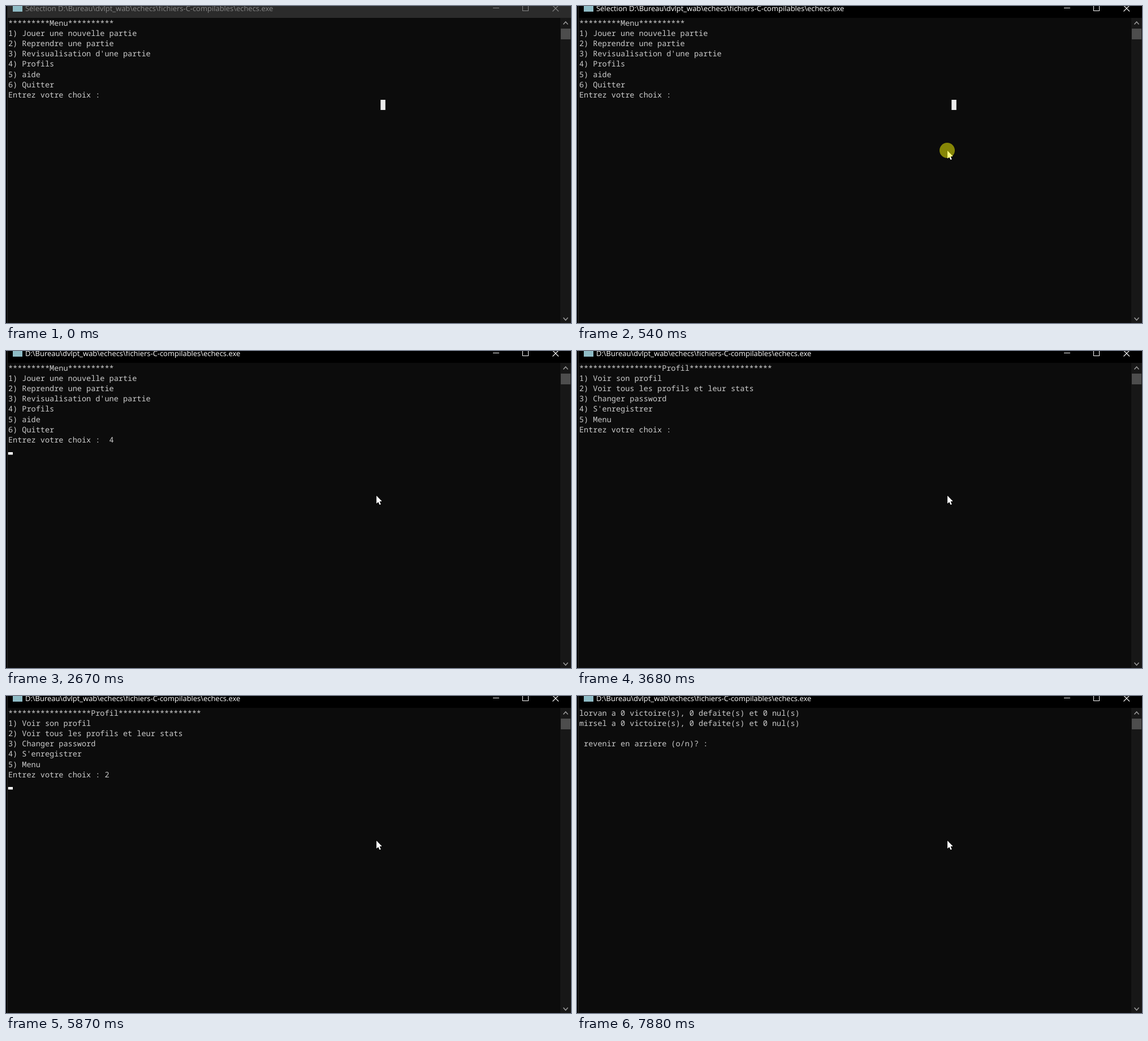
Animation, 999 px wide and 561 px high, one loop 8000 ms. Source, as an HTML page with a canvas:

```html
<!DOCTYPE html>
<html lang="fr">
<head>
<meta charset="utf-8">
<title>Console</title>
<style>
html, body { margin: 0; width: 999px; height: 561px; overflow: hidden; background: #0c0c0c; }
canvas { display: block; }
</style>
</head>
<body>
<canvas id="stage" width="999" height="561"></canvas>
<script>
const ctx = document.getElementById('stage').getContext('2d');
const LOOP = 8000;
const LEFT = 4, TOP = 21, CELL_W = 8.125, CELL_H = 18.1;
const PATH = 'D:\\Bureau\\dvlpt_wab\\echecs\\fichiers-C-compilables\\echecs.exe';
const stars = n => '*'.repeat(n);

const MENU = [
  stars(9) + 'Menu' + stars(10),
  '1) Jouer une nouvelle partie',
  '2) Reprendre une partie',
  "3) Revisualisation d'une partie",
  '4) Profils',
  '5) aide',
  '6) Quitter',
  'Entrez votre choix :  '
];
const PROFILE = [
  stars(18) + 'Profil' + stars(18),
  '1) Voir son profil',
  '2) Voir tous les profils et leur stats',
  '3) Changer password',
  "4) S'enregistrer",
  '5) Menu',
  'Entrez votre choix : '
];
const score = name => name + ' a 0 victoire(s), 0 defaite(s) et 0 nul(s)';
const STATS = [score('lorvan'), score('mirsel'), '', ' revenir en arriere (o/n)? : '];

// Each step: start time, page, typed answer, caret visible
const STEPS = [
  [0, MENU, '', false],
  [1010, MENU, '', true],
  [1540, MENU, '', false],
  [2070, MENU, '', true],
  [2270, MENU, '4', true],
  [2600, MENU, '4', false],
  [2670, MENU, '4\n', true],
  [2740, PROFILE, '', true],
  [3680, PROFILE, '', false],
  [4210, PROFILE, '', true],
  [4740, PROFILE, '', false],
  [4870, PROFILE, '2', true],
  [5270, PROFILE, '2', false],
  [5800, PROFILE, '2', true],
  [5870, PROFILE, '2\n', true],
  [5940, STATS, '', true],
  [6820, STATS, '', false],
  [7350, STATS, '', true],
  [7880, STATS, '', false]
];

function rect(color, x, y, w, h) {
  ctx.fillStyle = color;
  ctx.fillRect(x, y, w, h);
}

function line(color, width, ...pts) {
  ctx.strokeStyle = color;
  ctx.lineWidth = width;
  ctx.beginPath();
  for (let i = 0; i < pts.length; i += 2) ctx.lineTo(pts[i], pts[i + 1]);
  ctx.stroke();
}

function drawTitle(active, selecting) {
  const ink = active ? '#ffffff' : '#868686';
  rect(active ? '#000000' : '#2b2b2b', 3, 0, 996, 21);
  rect('#8fbcc6', 12, 0, 17, 10);
  ctx.font = '12.95px "Open Sans", "Noto Sans", sans-serif';
  ctx.fillStyle = ink;
  ctx.fillText((selecting ? 'Sélection ' : '') + PATH, 34, 9);
  line(ink, 1, 861, 3.5, 872, 3.5);
  ctx.strokeRect(913.5, -1.5, 10, 10);
  line(ink, 1.1, 966.5, -1, 977, 9.5);
  line(ink, 1.1, 977, -1, 966.5, 9.5);
}

function drawFrame() {
  rect('#0c0c0c', 0, 0, 999, 561);
  rect('#171717', 980, 21, 19, 540);
  rect('#4d4d4d', 981, 40, 17, 19);
  line('#9a9a9a', 1.5, 985.5, 32.5, 989.5, 28, 993.5, 32.5);
  line('#9a9a9a', 1.5, 985.5, 551.5, 989.5, 556, 993.5, 551.5);
  rect('#000000', 0, 0, 2, 561);
  rect('#2d2d2d', 2, 0, 1, 561);
}

function drawConsole(page, answer, caret) {
  const rows = (page.join('\n') + answer).split('\n');
  ctx.font = '13.54px "Noto Sans Mono", "DejaVu Sans Mono", monospace';
  ctx.fillStyle = '#cccccc';
  rows.forEach((row, i) => ctx.fillText(row, LEFT, TOP + i * CELL_H + 14));
  if (!caret) return;
  const col = rows[rows.length - 1].length;
  const bottom = Math.round(TOP + rows.length * CELL_H);
  rect('#ffffff', LEFT + col * CELL_W - 0.2, bottom - 5, 8.2, 4.5);
}

function drawPointer(t) {
  if (t < 130) return;
  const p = Math.min(1, Math.floor((t - 130) / 69) / 4);
  const rest = Math.pow(1 - p, 2);
  const x = 655 - 12 * rest, y = 256 + 279 * rest;
  const shape = [0, 0, 0, 14, 3.2, 11.2, 5.6, 16.2, 7.8, 15.2, 5.6, 10.3, 9.8, 10];
  ctx.beginPath();
  for (let i = 0; i < shape.length; i += 2) ctx.lineTo(x + shape[i], y + shape[i + 1]);
  ctx.closePath();
  ctx.strokeStyle = '#000000';
  ctx.lineWidth = 1.5;
  ctx.stroke();
  ctx.fillStyle = '#ffffff';
  ctx.fill();
  if (t >= 470 && t < 610) {
    ctx.fillStyle = 'rgba(255, 255, 0, 0.5)';
    ctx.beginPath();
    ctx.arc(654.5, 255.5, 13.5, 0, Math.PI * 2);
    ctx.fill();
  }
}

function draw(t) {
  const [, page, answer, caret] = STEPS.filter(s => s[0] <= t).pop();
  const selecting = t < 2270;
  drawFrame();
  drawTitle(t >= 470, selecting);
  drawConsole(page, answer, caret);
  if (selecting) rect('#ececec', 662.3, 166, 8.5, 18);
  drawPointer(t);
}

ctx.textRendering = 'geometricPrecision';
const start = performance.now();
function tick() {
  draw((performance.now() - start) % LOOP);
  requestAnimationFrame(tick);
}
tick();
</script>
</body>
</html>
```
